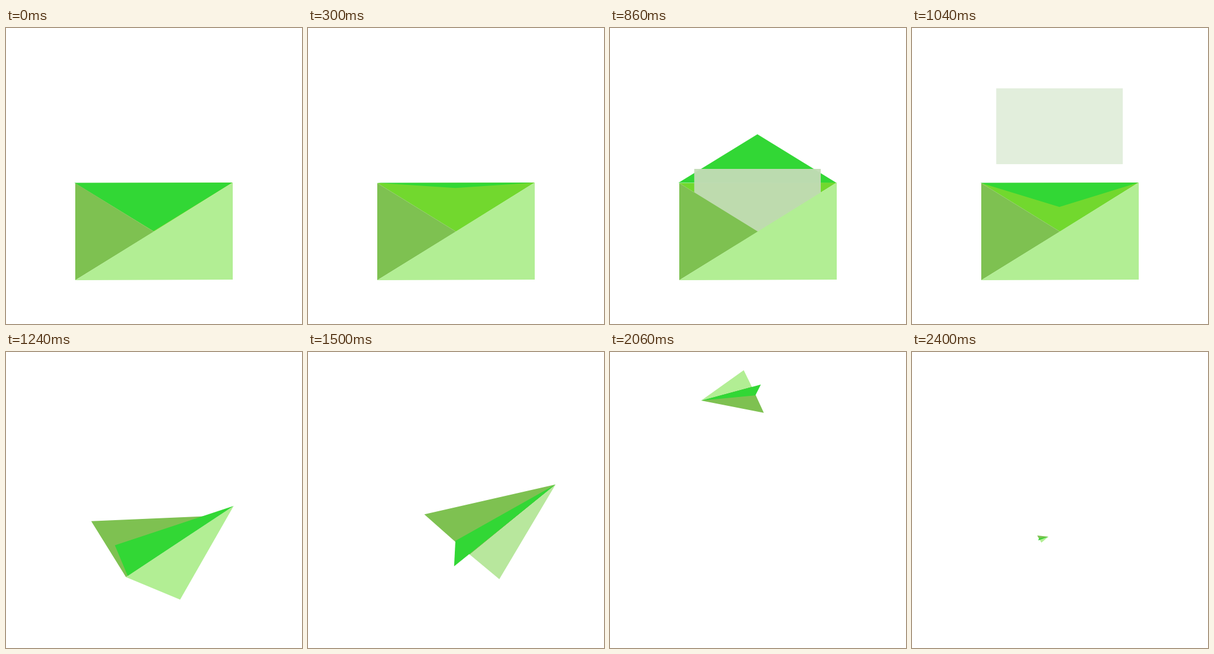
An HTML page for the animation above (2420 ms loop, 500x500 px).

```html
<!DOCTYPE html>
<html lang="en">
<head>
<meta charset="utf-8">
<title>Envelope to paper plane</title>
<style>
  html, body { margin: 0; width: 100%; height: 100%; overflow: hidden; background: #fff; }
  svg { display: block; width: 100%; height: 100%; }
</style>
</head>
<body>
<svg id="stage" viewBox="0 0 500 500"></svg>
<script>
const LOOP = 2420, STEP = 20;
const FOLD = 1080, FLY = 1280, TURN = 1720, LEG = 340;
const BRIGHT = '#32d735', DARK = '#7ec151', INNER = '#72d82e', PAPER = '#c2dcb6';

const stage = document.getElementById('stage');
const clamp = x => Math.min(1, Math.max(0, x));
const ramp = (t, a, b) => clamp((t - a) / (b - a));
const mix = (a, b, k) => a + (b - a) * k;
const mixPt = (a, b, k) => a.map((v, i) => mix(v, b[i], k));
const poly = (fill, ...pts) =>
  `<polygon fill="${fill}" points="${pts.map(p => p.map(v => v.toFixed(2)).join()).join(' ')}"/>`;

// Corners of the closed envelope
const env = {
  tip: [383, 261], left: [117, 262], fold: [117, 426], right: [383, 425],
  keelTop: [115.5, 261.5], keelEnd: [249, 343], mid: [250, 344]
};

// Corners of the plane, measured from its tip
const plane = {
  tip: [0, 0], left: [-177, 94], fold: [-96, 134], right: [-44, 158],
  keelTop: [-122, 120], keelEnd: [-114, 157], mid: [0, 0]
};

// Plane poses: tip position, rotation in degrees, scale
const launch = { at: [385, 259.6], deg: 20.2, size: 1.18 };
const climb = { at: [459, 152], deg: 0, size: 1 };
const back = { at: [154, 82], deg: -141, size: 0.538 };
const gone = { at: [230.5, 312], deg: -326, size: 0.095 };

// Repeated mixing evaluates a Bezier curve of any degree
function bezier(pts, u) {
  while (pts.length > 1) pts = pts.slice(1).map((p, i) => mixPt(pts[i], p, u));
  return pts[0];
}

function leg(from, c1, c2, to, u, turn = u) {
  return {
    at: bezier([from.at, c1, c2, to.at], u),
    deg: mix(from.deg, to.deg, turn),
    size: mix(from.size, to.size, turn)
  };
}

function pose(t) {
  if (t < TURN) {
    const u = ramp(t, FLY, TURN);
    return leg(launch, launch.at, [449, 200], climb, u, u * u);
  }
  const u = (t - TURN) / LEG;
  return u < 1
    ? leg(climb, [515, 8], [290, -4], back, u)
    : leg(back, [-100, 157], [95, 341], gone, u - 1);
}

function place([x, y], { at, deg, size }) {
  const r = deg * Math.PI / 180, c = Math.cos(r) * size, s = Math.sin(r) * size;
  return [at[0] + x * c - y * s, at[1] + x * s + y * c];
}

function drawEnvelope(t) {
  const open = ramp(t, 60, 600) - ramp(t, 920, FOLD);
  const rise = ramp(t, 640, FOLD);
  const alpha = 0.95 * Math.min(ramp(t, 640, 840), 1 - ramp(t, 980, 1100));
  const top = 297 - 236 * rise * rise;
  return poly(INNER, env.left, env.tip, env.mid)
    + poly(BRIGHT, env.keelTop, [249, mix(343, 179.5, open)], [382, 261.2])
    + `<rect x="142.3" y="${top.toFixed(2)}" width="213.7" height="128" fill="${PAPER}" opacity="${alpha.toFixed(3)}"/>`
    + poly(DARK, env.left, env.fold, env.mid)
    + poly('#b2ee94', env.tip, env.right, env.fold);
}

function drawPlane(t) {
  const now = pose(t), k = ramp(t, FOLD, FLY), p = {};
  for (const n in plane) p[n] = mixPt(env[n], place(plane[n], now), k);
  const pale = ramp(t, FLY, TURN) - ramp(t, TURN, TURN + LEG);
  const wing = `rgb(${mixPt([178, 238, 148], [190, 224, 166], pale).map(Math.round)})`;
  return poly(DARK, p.left, p.fold, p.mid)
    + poly(wing, p.tip, p.right, p.fold)
    + poly(BRIGHT, p.keelTop, p.keelEnd, p.tip);
}

function draw(ms) {
  const t = Math.floor(ms % LOOP / STEP) * STEP;
  stage.innerHTML = t < FOLD ? drawEnvelope(t) : drawPlane(t);
}

const start = performance.now();
function tick() {
  draw(performance.now() - start);
  requestAnimationFrame(tick);
}
tick();
</script>
</body>
</html>
```
